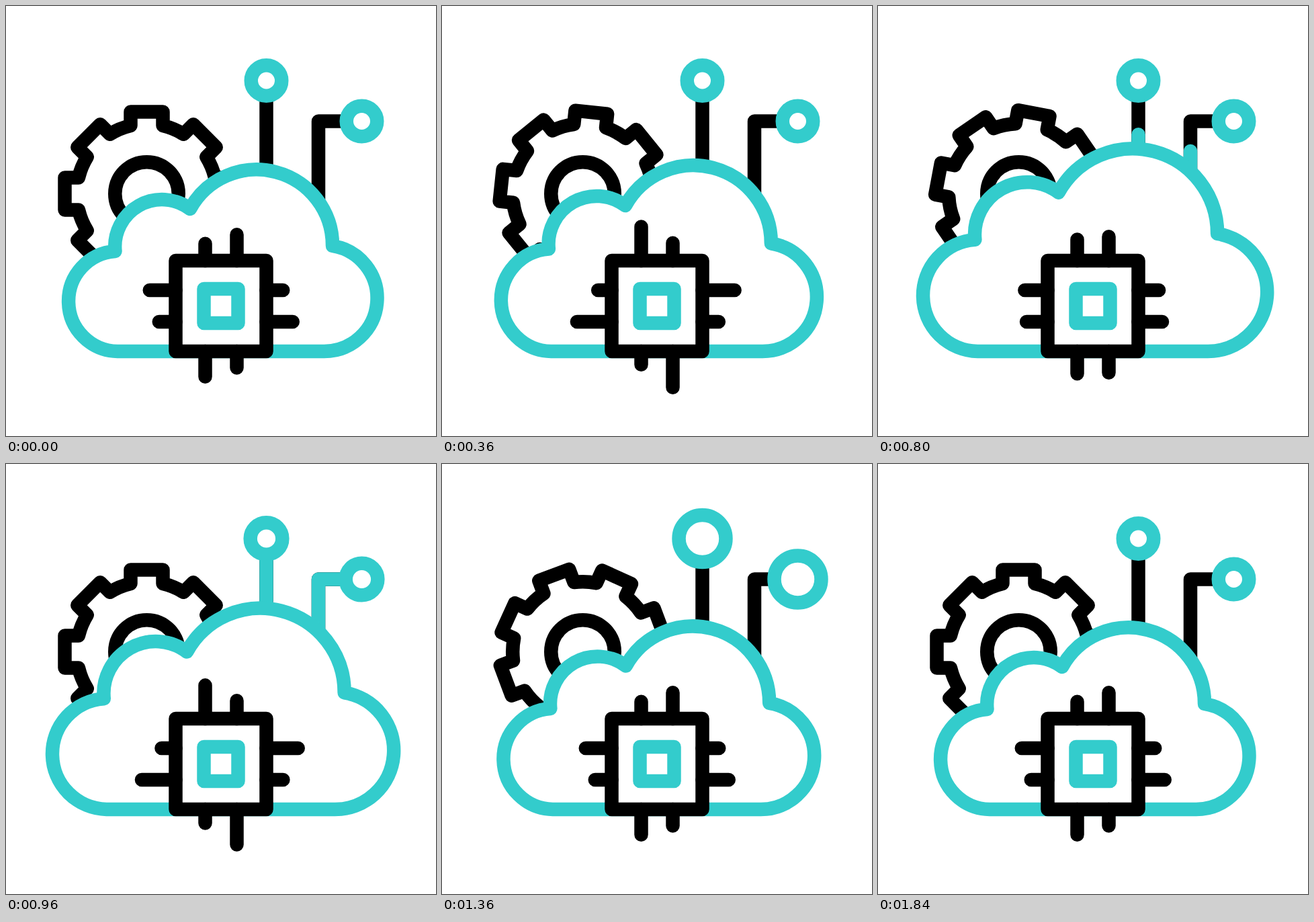
An HTML page for the animation above (2000 ms loop, 640 px wide and 640 px high).

```html
<!DOCTYPE html>
<html lang="en">
<head>
<meta charset="utf-8">
<title>Cloud computing icon</title>
<style>
  html, body { margin: 0; width: 100%; height: 100%; overflow: hidden; background: #fff; }
  svg { display: block; width: 100%; height: 100%; }
  svg * { stroke-width: 20.5; stroke-linecap: round; stroke-linejoin: round; }
  .ink { stroke: #000; fill: none; }
  .teal { stroke: #3cc; fill: none; }
  .solid { fill: #fff; }
</style>
</head>
<body>
<svg viewBox="0 0 640 640">
  <g transform="translate(209.5 279.5)">
    <path id="gear" class="ink"/>
    <circle class="ink" r="47.25"/>
  </g>
  <path class="ink" d="M387.5 243.5V134"/>
  <path class="ink" d="M465 294V171.5H506"/>
  <path class="teal pulse" pathLength="1" d="M387.5 243.5V134"/>
  <path class="teal pulse" pathLength="1" d="M465 294V171.5H506"/>
  <circle class="teal solid node" cx="387.5" cy="111"/>
  <circle class="teal solid node" cx="529.5" cy="171.5"/>
  <path id="cloud" class="teal solid" d="M166 514H473A79 79 0 0 0 486 357A113 113 0 0 0 274 302A70 70 0 0 0 162.5 365A74.6 74.6 0 0 0 166 514Z"/>
  <rect class="ink solid" x="252.5" y="379" width="135" height="135"/>
  <rect class="teal" x="294.5" y="421" width="51" height="51"/>
  <path id="pins" class="ink"/>
</svg>
<script>
const $ = id => document.getElementById(id);
const all = sel => document.querySelectorAll(sel);
const ramp = (t, from, to) => Math.min(1, Math.max(0, (t - from) / (to - from)));
const smooth = (t, from, to) => {
  const u = ramp(t, from, to);
  return u * u * (3 - 2 * u);
};

// Steep ease in and out: cubic-bezier(.55, 0, .45, 1)
function steep(u) {
  let lo = 0, hi = 1;
  for (let i = 0; i < 24; i++) {
    const s = (lo + hi) / 2, r = 1 - s;
    if (1.65 * s * r * r + 1.35 * s * s * r + s * s * s < u) lo = s; else hi = s;
  }
  return lo * lo * (3 - 2 * lo);
}

function gearPath() {
  const tooth = [[-24, -101.5], [-24, -122], [24, -122], [24, -101.5]];
  let d = '';
  for (let i = 0; i < 8; i++) {
    const c = Math.cos(i * Math.PI / 4), s = Math.sin(i * Math.PI / 4);
    tooth.forEach(([x, y], j) => {
      const cmd = j ? 'L' : i ? 'A104.3 104.3 0 0 1 ' : 'M';
      d += `${cmd}${x * c - y * s} ${x * s + y * c}`;
    });
  }
  return d + 'A104.3 104.3 0 0 1 -24 -101.5Z';
}
$('gear').setAttribute('d', gearPath());

// [start x, start y, direction, resting tip, travel]
const pins = [
  [296.5, 379, 'V', 353.75, -25.5], [343.5, 379, 'V', 340.25, 12.5],
  [296.5, 514, 'V', 551.75, -18], [343.5, 514, 'V', 538.5, 29.3],
  [252.5, 423, 'H', 213.75, 18.5], [252.5, 470, 'H', 227.75, -27],
  [387.5, 423, 'H', 412.25, 23.5], [387.5, 470, 'H', 426.75, -15]
];
const bump = (t, from) => smooth(t, from, from + 292) - smooth(t, from + 292, from + 584);

function draw(t) {
  $('gear').setAttribute('transform', `rotate(${180 * steep(ramp(t, 80, 1840))})`);

  const k = 1 + 0.115 * (smooth(t, 190, 780) - smooth(t, 860, 1450));
  $('cloud').setAttribute('transform', `translate(320 514) scale(${k}) translate(-320 -514)`);
  $('cloud').style.strokeWidth = 20.5 / k;

  const q = bump(t, 80) + bump(t, 705);
  $('pins').setAttribute('d', pins.map(([x, y, dir, tip, move]) => `M${x} ${y}${dir}${tip + move * q}`).join(''));

  const head = smooth(t, 645, 965), tail = smooth(t, 900, 1220);
  for (const p of all('.pulse')) {
    p.style.visibility = head > tail ? 'visible' : 'hidden';
    p.setAttribute('stroke-dasharray', `${head - tail} 2`);
    p.setAttribute('stroke-dashoffset', -tail);
  }

  const r = 22.75 + 13.2 * (smooth(t, 900, 1240) - smooth(t, 1300, 1660));
  for (const n of all('.node')) n.setAttribute('r', r);
}

const start = performance.now();
function tick() {
  const t = (performance.now() - start) % 2000;
  draw(Math.floor(t / 40) * 40);
  requestAnimationFrame(tick);
}
tick();
</script>
</body>
</html>
```
